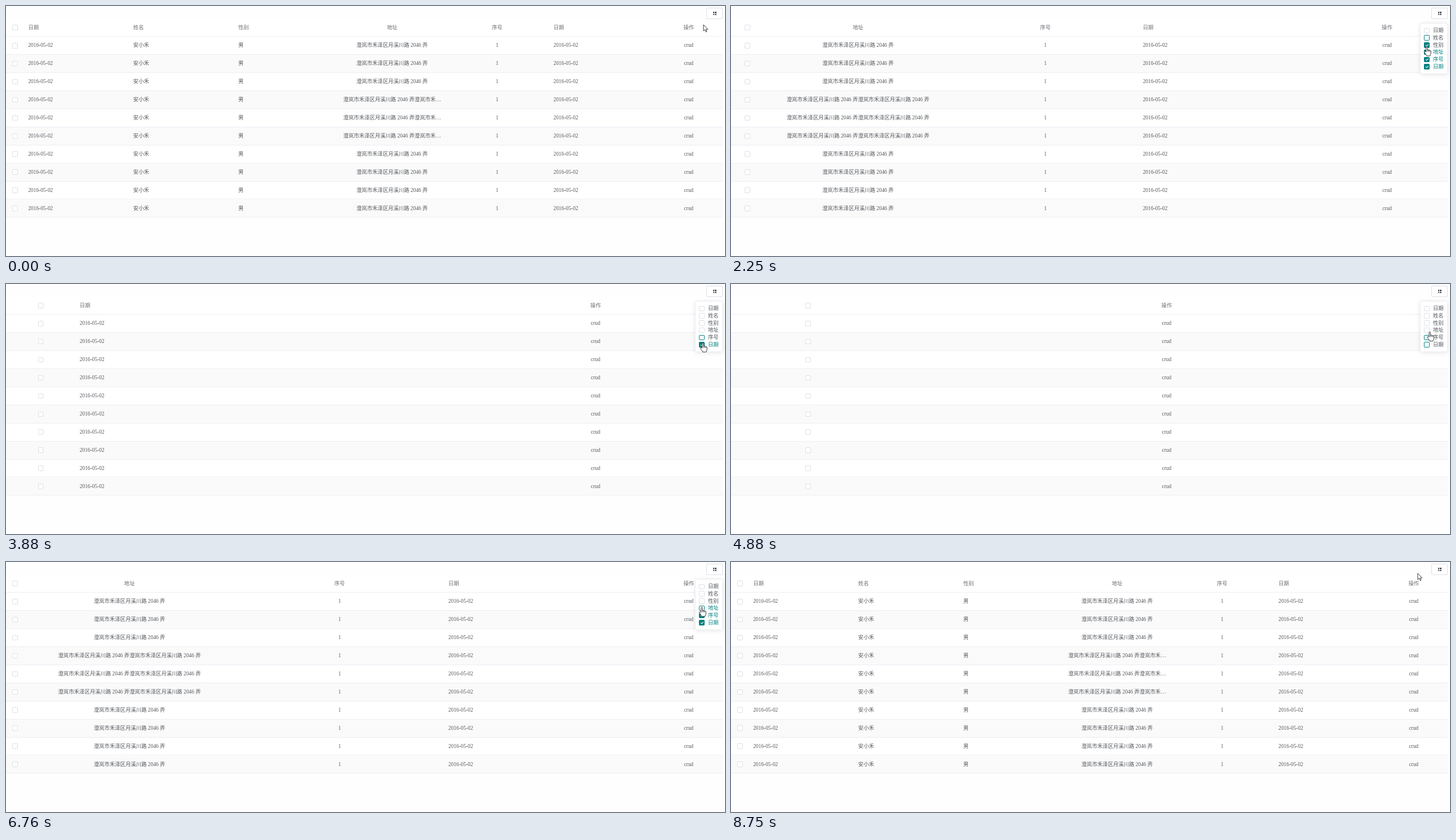
Animation, 1269 px wide and 441 px high, one loop 8870 ms. Source, as an HTML page:

```html
<!DOCTYPE html>
<html lang="zh-CN">
<head>
<meta charset="utf-8">
<style>
html, body { margin: 0; width: 100%; height: 100%; overflow: hidden; background: #fefefe; }
body { position: relative; color: #54575c; font: 9.333px "Liberation Serif", "Noto Sans CJK SC", "Noto Sans CJK", serif; }
body *, .box::after { position: absolute; box-sizing: border-box; }
.row { left: 0; width: 1265px; height: 31.9px; background: #fff; border-bottom: 1px solid #ebeef5; }
.row.odd { background: #fafafa; }
.col { top: 22.5px; }
.cell { left: 0; width: 100%; height: 31.9px; line-height: 31.9px; padding-left: 6.7px; white-space: nowrap; }
.center .cell { text-align: center; padding: 0; }
.head { color: #6c6f75; font-weight: 500; }
.box { width: 9.5px; height: 9.5px; border: 1px solid #dcdfe6; border-radius: 1.3px; background: #fff; }
.box.active { border-color: #008080; }
.box.on { border-color: #008080; background: #008080; }
.box.on::after { content: ""; left: 2.6px; top: .4px; width: 2.7px; height: 5.2px; border: solid #fff; border-width: 0 1px 1px 0; transform: rotate(45deg); }
.cell .box { left: calc(50% - 5px); top: 10.7px; }
#button { left: 1236px; top: 3px; width: 29px; height: 20px; border: 1px solid #dcdfe6; border-radius: 2px; background: #fff; color: #54575c; }
#button.hover { color: #008080; border-color: #b3d9d9; background: #e6f2f2; }
#button i { width: 2.8px; height: 2.8px; background: currentColor; }
#popover { left: 1216px; top: 30px; width: 48.5px; height: 90px; background: #fff; border: 1px solid #ebeef5; border-radius: 2.7px; box-shadow: 0 1.3px 8px rgba(0,0,0,.1); }
.item { left: 0; width: 100%; height: 12.7px; line-height: 12.7px; padding-left: 22px; white-space: nowrap; }
.item.on { color: #008080; }
.item .box { left: 6px; top: 1.6px; }
#cursor { left: 0; top: 0; overflow: visible; width: 1px; height: 1px; }
#cursor path { fill: #fff; stroke: #222; stroke-width: .9; stroke-linejoin: round; }
</style>
</head>
<body>
<script>
const ADDRESS = '澄岚市禾泽区月溪川路 2046 弄';
const DATE = '2016-05-02';
const TABLE_WIDTH = 1265, ACTION_WIDTH = 120, STEP = 125, LOOP = 8870;
const EM = 9.333, ADDRESS_EMS = 13.5, CELL_PADDING = 12.7;
const ARROW = 'M0 0V11L2.6 8.7L4.4 12.8L6 12L4.3 8.2H7.7Z';
const HAND = 'M-1.2 9V1A1.2 1.2 0 0 1 1.2 1V5.5C2 5 3 5.2 3.4 6C4.2 5.6 5 5.9 5.4 6.7' +
  'C6.3 6.4 7.3 7 7.3 8V11C7.3 13 6 14 5.8 16H-.2C-.6 14-3 12-4.2 9.6C-5 8.2-3.4 7.4-2.6 8.2Z' +
  'M1.2 5.5V8.5M3.4 6V8.5M5.4 6.7V8.5';

// off and on: the steps at which a field is hidden and shown again
const fields = [
  { label: '日期', text: DATE, off: 11, on: 63 },
  { label: '姓名', text: '安小禾', off: 14, on: 60 },
  { label: '性别', text: '男', off: 18, on: 57 },
  { label: '地址', text: ADDRESS, center: true, off: 22, on: 54 },
  { label: '序号', text: '1', center: true, off: 29, on: 50 },
  { label: '日期', text: DATE, off: 33, on: 46 }
];

// step, x, y
const path = [
  [0, 1231, 33], [1, 1238, 28], [2, 1246, 14], [3, 1247, 10], [6, 1247, 10], [8, 1243, 28],
  [10, 1227, 43], [11, 1227, 58], [14, 1228, 57], [15, 1227, 64], [17, 1228, 70], [18, 1228, 72],
  [21, 1228, 80], [22, 1228, 79], [26, 1227, 79], [27, 1227, 95], [29, 1228, 95], [31, 1230, 104],
  [35, 1230, 106], [37, 1230, 106], [40, 1235, 74], [42, 1230, 92], [45, 1230, 104], [46, 1231, 97],
  [50, 1228, 92], [53, 1228, 80], [55, 1228, 80], [57, 1228, 68], [60, 1229, 56], [63, 1228, 43],
  [65, 1226, 32], [66, 1219, 28], [67, 1212, 20], [71, 1212, 20]
];

function add(parent, className, text = '', tag = 'div') {
  const el = document.createElement(tag);
  el.className = className;
  el.textContent = text;
  parent.append(el);
  return el;
}

const longCells = [];

function addColumn({ label, text, center }) {
  const col = add(document.body, center ? 'col center' : 'col');
  for (let r = 0; r < 11; r++) {
    const cell = add(col, r ? 'cell' : 'cell head', r ? text : label);
    cell.style.top = r * 31.9 + 'px';
    if (!label) add(cell, 'box', '', 'i');
    if (text === ADDRESS && r >= 4 && r <= 6) longCells.push(cell);
  }
  return col;
}

for (let r = 0; r < 11; r++) {
  add(document.body, r && r % 2 === 0 ? 'row odd' : 'row').style.top = 22.5 + r * 31.9 + 'px';
}
const selectCol = addColumn({ label: '', text: '', center: true });
fields.forEach(f => f.col = addColumn(f));
const actionCol = addColumn({ label: '操作', text: 'crud', center: true });

const button = add(document.body, '');
button.id = 'button';
for (let i = 0; i < 4; i++) {
  const dot = add(button, '', '', 'i');
  dot.style.left = 10.5 + (i % 2) * 3.6 + 'px';
  dot.style.top = 5.9 + (i >> 1) * 3.6 + 'px';
}

const popover = add(document.body, '');
popover.id = 'popover';
fields.forEach((f, i) => {
  f.item = add(popover, 'item', f.label);
  f.item.style.top = 6.2 + i * 12.7 + 'px';
  f.box = add(f.item, 'box', '', 'i');
});

document.body.insertAdjacentHTML('beforeend', '<svg id="cursor"><path/></svg>');
const pointer = document.querySelector('#cursor path');

const isOn = (f, step) => step < f.off || step >= f.on;

function cursorAt(step) {
  const n = Math.max(1, path.findIndex(p => p[0] >= step));
  const [a, b] = [path[n - 1], path[n]];
  const u = Math.max(0, (step - a[0]) / (b[0] - a[0]));
  return [a[1] + (b[1] - a[1]) * u, a[2] + (b[2] - a[2]) * u];
}

const overButton = ([x, y]) => x > 1236 && y > 3 && y < 23;
const itemAt = ([x, y]) => x >= 1223 && x <= 1258 ? Math.floor((y - 37.2) / 12.7) : -1;

// The address twice over, cut with an ellipsis one em wide where it does not fit.
function longAddress(colWidth) {
  const ems = (colWidth - CELL_PADDING) / EM;
  const text = ADDRESS + ADDRESS;
  if (ems >= 2 * ADDRESS_EMS) return text;
  return text.slice(0, ADDRESS.length + Math.floor(ems - ADDRESS_EMS - 1)) + '…';
}

function layout(step) {
  const shown = fields.filter(f => isOn(f, step));
  // Hiding a field stretches the old widths; showing one lays the table out afresh.
  const stretched = step >= 11 && step < 46;
  const first = stretched ? 33 : 32.5;
  const width = stretched ? 185.33 : (TABLE_WIDTH - first - ACTION_WIDTH) / shown.length;
  const scale = TABLE_WIDTH / (first + width * shown.length + ACTION_WIDTH);
  let x = 0;
  const place = (col, w) => {
    col.style.left = x + 'px';
    col.style.width = w * scale + 'px';
    x += w * scale;
  };
  fields.forEach(f => f.col.hidden = !shown.includes(f));
  place(selectCol, first);
  shown.forEach(f => place(f.col, width));
  place(actionCol, ACTION_WIDTH);
  longCells.forEach(cell => cell.textContent = longAddress(width * scale));
}

function render(step) {
  layout(step);
  const pos = cursorAt(step);
  const open = Math.max(0, Math.min(1, (step - 4) / 2, (70 - step) / 2));
  popover.style.opacity = open;
  button.className = overButton(pos) ? 'hover' : '';

  // Boxes change colour one step after their label.
  const lastChange = f => Math.max(...[f.off, f.on].filter(s => s < step), 0);
  const latest = Math.max(...fields.map(lastChange));
  const hovered = itemAt(cursorAt(Math.max(0, step - 1)));
  fields.forEach((f, i) => {
    const active = i === hovered || (latest > 0 && lastChange(f) === latest);
    f.item.classList.toggle('on', isOn(f, step));
    f.box.classList.toggle('on', isOn(f, step - 1));
    f.box.classList.toggle('active', active);
  });

  const item = itemAt(pos);
  const isHand = overButton(pos) || (open > 0 && item >= 0 && item < fields.length);
  pointer.setAttribute('d', isHand ? HAND : ARROW);
  pointer.setAttribute('transform', `translate(${pos})`);
}

let current = -1;
function tick() {
  const step = Math.floor((performance.now() % LOOP + 6) / STEP) % 71;
  if (step !== current) render(current = step);
  requestAnimationFrame(tick);
}
tick();
</script>
</body>
</html>
```
